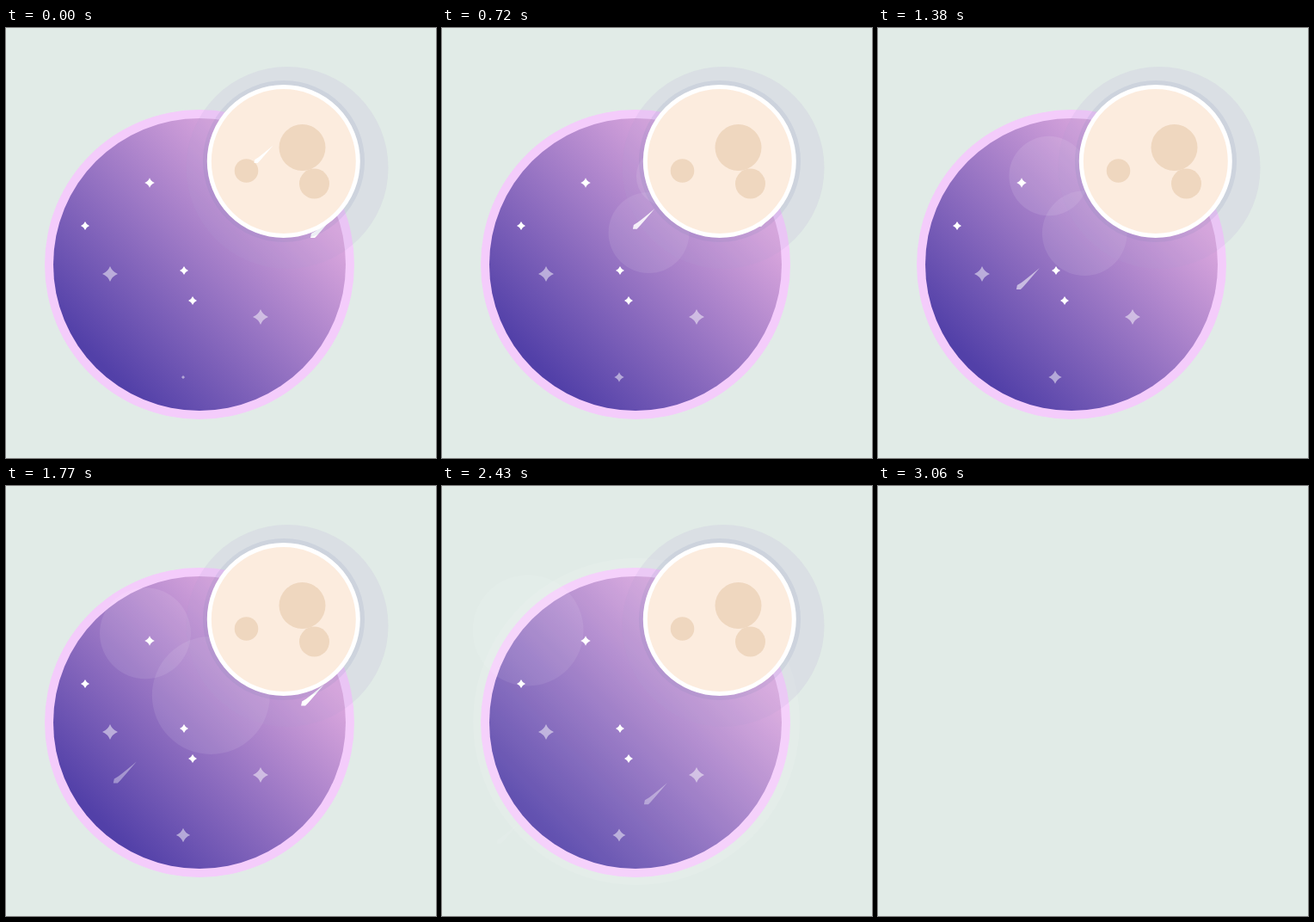
Write an HTML page that moves like this. It is 500x500 px and loops after 3090 ms.

```html
<!DOCTYPE html>
<html lang="en">
<head>
<meta charset="utf-8">
<title>Planet and moon</title>
<style>
  html, body { margin: 0; width: 100%; height: 100%; overflow: hidden; background: #e1ebe7; }
  svg { display: block; width: 100%; height: 100%; }
</style>
</head>
<body>
<svg viewBox="0 0 500 500">
  <defs>
    <linearGradient id="sky" gradientUnits="userSpaceOnUse" x1="110" y1="390" x2="325" y2="175">
      <stop offset="0" stop-color="#5240a8"/>
      <stop offset="1" stop-color="#dca8de"/>
    </linearGradient>
    <path id="star" d="M0-1Q.28-.28 1 0Q.28 .28 0 1Q-.28 .28-1 0Q-.28-.28 0-1Z"/>
    <path id="comet" d="M0 0L1-5L6-8Q14-14 27-25Q15-11 8-3L5 0Z"/>
  </defs>
  <g id="scene">
    <circle cx="225" cy="275" r="180" fill="#f4ccfb"/>
    <circle cx="225" cy="275" r="170" fill="url(#sky)"/>
    <circle id="pulse" fill="#fff"/>
    <circle id="bubble" fill="#fff"/>
    <g fill="#fff">
      <use href="#star" transform="translate(167 180) scale(5.8)"/>
      <use href="#star" transform="translate(92 230) scale(5)"/>
      <use href="#star" transform="translate(207 282) scale(5)"/>
      <use href="#star" transform="translate(217 317) scale(5)"/>
      <g opacity=".5">
        <use href="#star" transform="translate(121 286) scale(9)"/>
        <use href="#star" transform="translate(296 336) scale(9)"/>
        <use href="#star" id="twinkle"/>
      </g>
    </g>
    <circle cx="327" cy="162.5" r="117.5" fill="#ac98d2" opacity=".15"/>
    <use id="hiddenComet" href="#comet" fill="#fff"/>
    <circle cx="323" cy="155" r="94" fill="#6a78a8" opacity=".12"/>
    <circle cx="322.8" cy="155" r="86.5" fill="#fcecde" stroke="#fff" stroke-width="5"/>
    <g fill="#efd7bf">
      <circle cx="344.5" cy="139" r="27"/>
      <circle cx="279.5" cy="166" r="13.8"/>
      <circle cx="358.5" cy="181" r="17.5"/>
    </g>
    <use id="frontComet" href="#comet" fill="#fff"/>
  </g>
</svg>
<script>
  const LOOP = 3090, STEP = 30, BLANK_AT = 3060;
  const byId = id => document.getElementById(id);
  const set = (id, attrs) => Object.entries(attrs).forEach(([k, v]) => byId(id).setAttribute(k, v));

  // 0 before start, 1 after end, linear between.
  const ramp = (t, start, end) => Math.min(1, Math.max(0, (t - start) / (end - start)));

  function place(id, x, y, scale, opacity = 1) {
    set(id, { transform: `translate(${x} ${y}) scale(${scale})`, opacity });
  }

  function draw(t) {
    byId('scene').style.display = t >= BLANK_AT ? 'none' : '';

    place('twinkle', 206, 406, 2.3 + 5.9 * Math.sin(Math.PI * t / 3700));

    // The pulse rests, then swells past the planet's rim.
    const swell = (Math.max(0, t - 1020) / 1410) ** 3;
    set('pulse', {
      cx: 240.5 - 14.5 * swell,
      cy: 238 + 36 * swell,
      r: 47 + 143 * swell,
      opacity: .09 * ramp(t, 0, 420) * (1 - ramp(t, 2430, 2880))
    });

    // The bubble drifts out from behind the moon.
    set('bubble', {
      cx: 328 - .0938 * t,
      cy: 172.5 - 11.5 * (t / BLANK_AT) ** 4,
      r: 22 + .0175 * t,
      opacity: .13 * (1 - t / 6000)
    });

    place('frontComet', 288.5 - .0925 * t, 157 + .1065 * t,
      .82 + .18 * ramp(t, 0, 1020), 1 - ramp(t, 420, 2610));

    // Slips back behind the moon before shooting out.
    const travel = 17 * (1 - ramp(t, 0, 1000)) + .164 * Math.max(0, t - 1600);
    place('hiddenComet', 371 - travel, 226 + 1.06 * travel, 1, 1 - ramp(t, 1770, 2820));
  }

  // The opening pose is held for two steps.
  function tick(now) {
    const step = Math.floor((now % LOOP) / STEP) * STEP;
    draw(step < 2 * STEP ? 0 : step);
    requestAnimationFrame(tick);
  }
  tick(performance.now());
</script>
</body>
</html>
```
